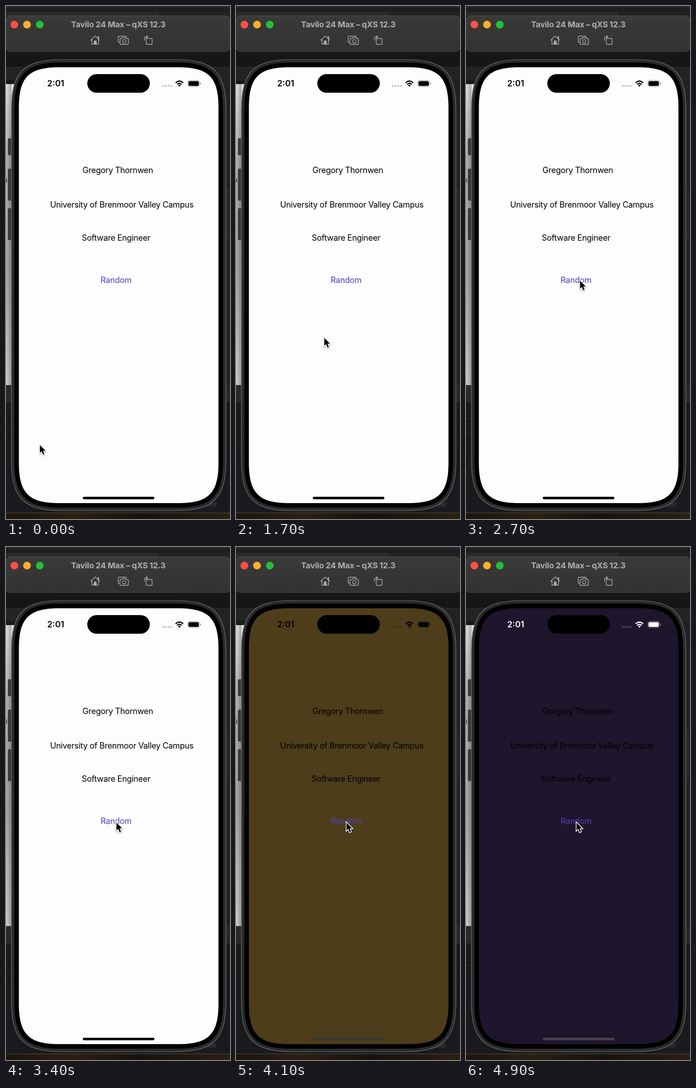
An HTML page that plays this animation: 496x1130 px, repeating every 5000 ms.

```html
<!DOCTYPE html>
<html lang="en">
<head>
<meta charset="utf-8">
<title>Random colour</title>
<style>
  html, body { margin: 0; width: 100%; height: 100%; overflow: hidden; background: #151515; }
  svg { display: block; width: 496px; height: 1130px; }
  text { font-family: Inter, "Liberation Sans", sans-serif; }
  .label { font-size: 18.1px; letter-spacing: -.33px; text-anchor: middle; }
  .icon { fill: none; stroke: #b4b3b1; stroke-width: 1.4; stroke-linecap: round; stroke-linejoin: round; }
</style>
</head>
<body>
<svg viewBox="0 0 496 1130">
  <defs>
    <linearGradient id="paper" x1="0" y1="0" x2="0" y2="1">
      <stop offset="0" stop-color="#e2e2e2"/>
      <stop offset=".25" stop-color="#b4b4b4"/>
      <stop offset=".6" stop-color="#a9a9a9"/>
      <stop offset="1" stop-color="#cfcfcf"/>
    </linearGradient>
    <linearGradient id="shade">
      <stop offset="0" stop-opacity="0"/>
      <stop offset="1" stop-opacity=".25"/>
    </linearGradient>
    <linearGradient id="wall">
      <stop offset="0" stop-color="#1c150c"/>
      <stop offset=".3" stop-color="#2b2010"/>
      <stop offset=".6" stop-color="#17120d"/>
      <stop offset="1" stop-color="#2a2012"/>
    </linearGradient>
    <linearGradient id="bar" x1="0" y1="0" x2="0" y2="1">
      <stop offset="0" stop-color="#3a3a39"/>
      <stop offset="1" stop-color="#323231"/>
    </linearGradient>
    <filter id="drop" x="-50%" y="-30%" width="200%" height="180%">
      <feDropShadow dx="0" dy="1.5" stdDeviation="1.2" flood-opacity=".4"/>
    </filter>
  </defs>

  <!-- windows behind the phone -->
  <rect width="496" height="1130" fill="#161616"/>
  <rect width="496" height="13" fill="#1f1f1f"/>
  <rect y="1.5" width="496" height="1" fill="#3b3b3b"/>
  <rect y="13" width="338" height="9" fill="#2a2a2a"/>
  <rect x="338" y="13" width="158" height="9" fill="#222"/>
  <rect y="134" width="496" height="29" fill="#232323"/>
  <rect y="134" width="496" height="1" fill="#303030"/>
  <rect y="163" width="496" height="9" fill="#191919"/>
  <rect x="480" y="163" width="16" height="710" fill="#212122"/>
  <rect y="172" width="20" height="663" fill="url(#paper)"/>
  <rect y="172" width="12" height="663" fill="url(#shade)"/>
  <text x="-6.5" y="390" font-size="13" fill="#111">Ur</text>
  <rect y="835" width="496" height="38" fill="#2a2a2b"/>
  <rect y="873" width="496" height="81" fill="#1a1a1b"/>
  <rect y="914" width="496" height="1.2" fill="#050505"/>
  <rect y="953" width="496" height="1.2" fill="#050505"/>
  <rect y="954" width="496" height="163" fill="#1a1a1e"/>
  <text x="467" y="1103" font-size="15.5" text-anchor="end" fill="#444446">Filter</text>
  <rect y="1116" width="496" height="1.4" fill="#4a4a4a"/>
  <rect y="1117.4" width="496" height="13" fill="url(#wall)"/>

  <!-- window bar -->
  <rect x="-.5" y="21.5" width="497" height="78.5" rx="10" fill="url(#bar)" stroke="#555553"/>
  <circle cx="18.5" cy="41" r="8.5" fill="#fe5049"/>
  <circle cx="46.5" cy="41" r="8.5" fill="#fdb12b"/>
  <circle cx="74.8" cy="41" r="8.5" fill="#23c038"/>
  <text x="248.5" y="46.5" font-size="18" font-weight="700" letter-spacing="-.3" text-anchor="middle" fill="#b0afad">Tavilo 24 Max – qXS 12.3</text>
  <g class="icon">
    <path d="M187.5 75.5 197.5 66 207.5 75.5M190.3 73.5V84H204.700V73.500M203.600 71V67.500H205.300V73"/>
    <path d="M195.300 84V77H199.700V84Z" fill="#b4b3b1"/>
    <path d="M250.500 80.500Q248.500 80.300 248.500 78V69Q248.500 66.500 251 66.500H264Q266.500 66.500 266.800 68.500"/>
    <path d="M254.500 71.500H257.500L259 69.500H264.500L266 71.500H269Q271 71.500 271 73.500V82.500Q271 84.500 269 84.500H254.500Q252.500 84.500 252.500 82.500V73.500Q252.500 71.500 254.500 71.500Z"/>
    <circle cx="261.800" cy="77.800" r="3.700"/>
    <rect x="310.500" y="71.500" width="13" height="13" rx="1.500"/>
    <path d="M306.800 75.500V71.500Q306.800 68 310.500 68H313.500M311 65.300 313.800 68 311 70.700"/>
  </g>

  <!-- phone -->
  <g fill="#393939" stroke="#555" stroke-width="1">
    <rect x="4.500" y="291.500" width="10" height="37" rx="2"/>
    <rect x="4.500" y="358.500" width="10" height="70" rx="2"/>
    <rect x="4.500" y="445.500" width="10" height="70" rx="2"/>
    <rect x="484" y="403.500" width="8" height="111" rx="2" fill="#252525" stroke="#3a3a3a"/>
  </g>
  <path id="frame" fill="#2a2a2a" stroke="#747474" stroke-width="1.200"/>
  <path id="bezel" fill="#000"/>
  <path id="screen"/>
  <rect x="180" y="150" width="138.500" height="41" rx="20.500"/>
  <text id="clock" x="110" y="177.300" font-size="18.500" font-weight="600" text-anchor="middle">2:01</text>
  <g id="status">
    <g id="dots" opacity=".24"></g>
    <g fill="none" stroke="currentColor" stroke-width="2.600">
      <path d="M375.700 169.300Q384 161.500 392.300 169.300"/>
      <path d="M378.900 172.600Q384 168 389.100 172.600"/>
    </g>
    <path d="M381 174.700Q384 172.200 387 174.700L384 178Z" fill="currentColor"/>
    <rect x="402.200" y="163.700" width="26.600" height="14" rx="4.500" fill="none" stroke="currentColor" stroke-opacity=".4"/>
    <rect x="404" y="165.500" width="23" height="10.400" rx="2.900" fill="currentColor"/>
    <path d="M430.300 168.300Q432 169 432 170.700T430.300 173.100Z" fill="currentColor" opacity=".45"/>
  </g>
  <text class="label" x="247.500" y="367.500">Gregory Thornwen</text>
  <text class="label" x="256.500" y="443.500">University of Brenmoor Valley Campus</text>
  <text class="label" x="243.700" y="517">Software Engineer</text>
  <text class="label" x="243.700" y="609.500" fill="#4f43b4">Random</text>
  <rect id="home" x="170" y="1081" width="158.500" height="5.500" rx="2.750"/>
  <g id="pointer" filter="url(#drop)">
    <path d="M0 0V17.500L4 13.800 7 21.300 10.200 20 7.100 12.700H12.600Z" fill="#000" stroke="#fff" stroke-width="3" paint-order="stroke"/>
  </g>
</svg>
<script>
const LOOP = 5000, STEP = 100;
const el = id => document.getElementById(id);

// Rounded rectangle with continuous-curvature corners.
function squircle(x0, y0, x1, y1, r) {
  const e = r * 1.35, c = r * 0.331;
  return `M${x0 + e} ${y0}H${x1 - e}C${x1 - c} ${y0} ${x1} ${y0 + c} ${x1} ${y0 + e}` +
    `V${y1 - e}C${x1} ${y1 - c} ${x1 - c} ${y1} ${x1 - e} ${y1}` +
    `H${x0 + e}C${x0 + c} ${y1} ${x0} ${y1 - c} ${x0} ${y1 - e}` +
    `V${y0 + e}C${x0} ${y0 + c} ${x0 + c} ${y0} ${x0 + e} ${y0}Z`;
}
el("frame").setAttribute("d", squircle(12, 118, 487, 1111.5, 82));
el("bezel").setAttribute("d", squircle(18.5, 124.5, 480.5, 1105, 76));
el("screen").setAttribute("d", squircle(28.5, 135, 470.5, 1095, 66));
el("dots").innerHTML = [0, 1, 2, 3]
  .map(i => `<circle cx="${347.3 + i * 6}" cy="176" r="2.1" fill="currentColor"/>`).join("");

// Pointer stops: time, x, y. The pointer jumps from one to the next.
const stops = [
  [0, 75, 967], [100, 140.5, 803], [600, 195.5, 731],
  [2100, 197, 725], [2200, 202, 702], [2300, 213, 664], [2400, 227, 633],
  [2500, 239.5, 613], [2600, 249, 602], [2700, 252.5, 605], [2900, 244.5, 607]
];

// Screen themes: start, background, status colour, home bar.
const themes = [
  [0, "#fdfdfd", "#000", "#000"],
  [4100, "#4e3d1b", "#000", "#393632"],
  [4200, "#1f152c", "#fff", "#49444b"]
];
const CLOCK_LIGHT = 4300;

const current = (list, t) => list.filter(item => item[0] <= t).pop();

function draw(now) {
  const t = Math.floor((now % LOOP) / STEP) * STEP;
  const [, x, y] = current(stops, t);
  const [, back, status, home] = current(themes, t);
  el("pointer").setAttribute("transform", `translate(${x} ${y})`);
  el("screen").setAttribute("fill", back);
  el("status").style.color = status;
  el("home").setAttribute("fill", home);
  el("clock").setAttribute("fill", t < CLOCK_LIGHT ? "#000" : "#fff");
}

let start;
function tick(now) {
  start ??= now;
  draw(now - start);
  requestAnimationFrame(tick);
}
draw(0);
requestAnimationFrame(tick);
</script>
</body>
</html>
```
